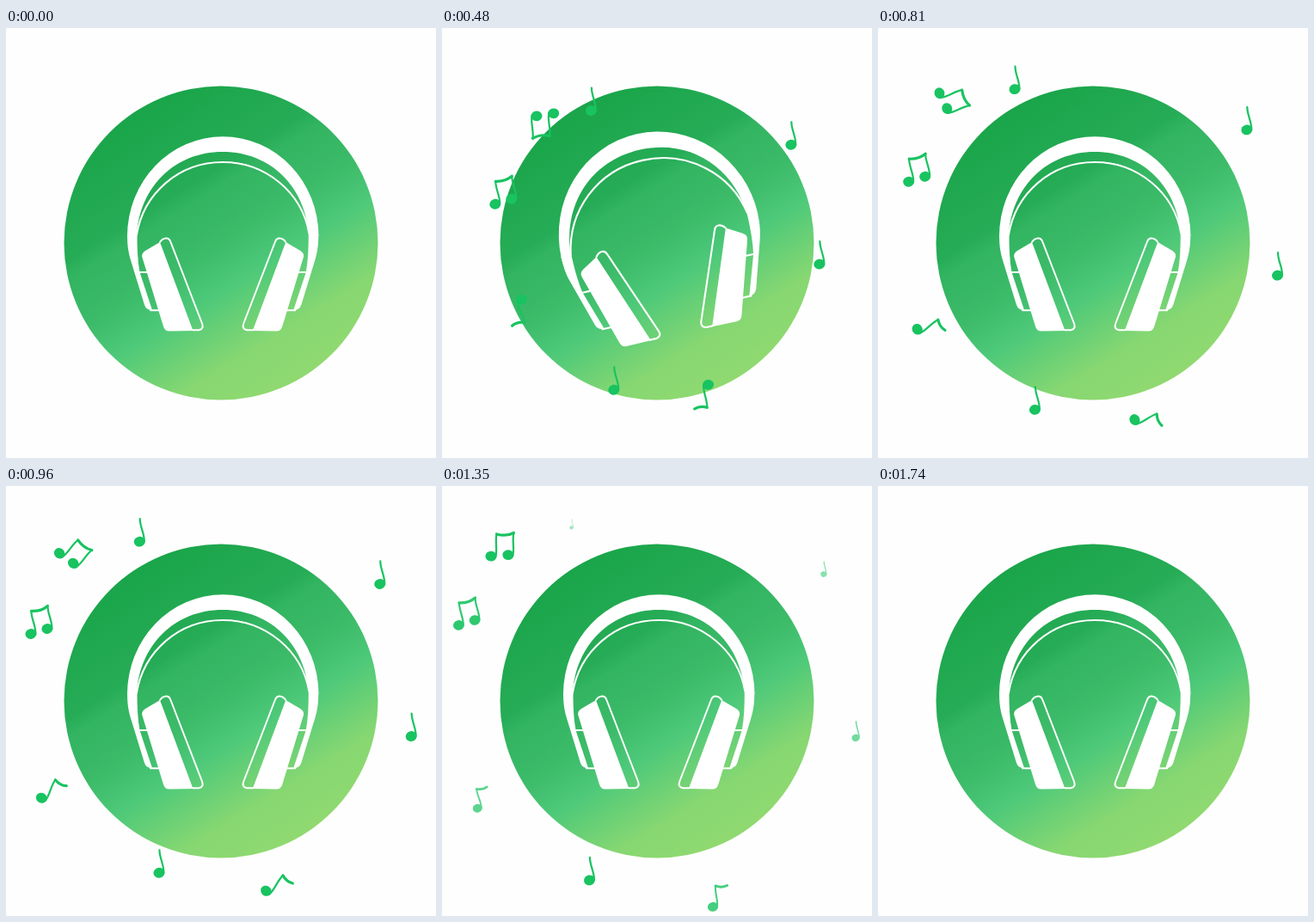
Animation, 500 px wide and 500 px high, one loop 2040 ms. Source, as an HTML page:

```html
<!DOCTYPE html>
<html lang="en">
<head>
<meta charset="utf-8">
<title>Headphones</title>
<style>
  html, body { margin: 0; width: 100%; height: 100%; overflow: hidden; background: #fefefe; }
  svg { display: block; width: 100%; height: 100%; }
  .line { fill: none; stroke: #fff; stroke-width: 2; stroke-linejoin: round; stroke-linecap: round; }
  #notes ellipse { fill: #18c360; }
  #notes path { fill: none; stroke: #18c360; stroke-width: 2.2; stroke-linecap: round; stroke-linejoin: round; }
  #notes .beam { stroke-width: 3.2; }
</style>
</head>
<body>
<svg viewBox="0 0 500 500">
  <defs>
    <linearGradient id="disc" gradientUnits="userSpaceOnUse" x1="154" y1="95.5" x2="346" y2="404.5">
      <stop offset="0" stop-color="#1aa54a"/>
      <stop offset=".29" stop-color="#26ac56"/>
      <stop offset=".34" stop-color="#32b461"/>
      <stop offset=".5" stop-color="#3cbb69"/>
      <stop offset=".63" stop-color="#4dc979"/>
      <stop offset=".84" stop-color="#86d772"/>
      <stop offset="1" stop-color="#90d970"/>
    </linearGradient>
    <g id="cup">
      <path fill="#fff" d="M141 240C141 252 142 260 145 270L161 322Q163 328 170 328L155.500 284C153 270 152.500 256 152.500 240Z"/>
      <path class="line" d="M155.500 284H163.500M168 328.300H178"/>
      <path fill="#fff" d="M158.500 267Q157 262 162 259L179 249L217.500 352L190 352.500Q184.500 352.500 183 347Z"/>
      <path class="line" d="M179 249C183 243.500 189.500 242.500 191.500 249L228 343.500Q230.500 350 224 351.300H217"/>
    </g>
  </defs>
  <circle cx="250" cy="250" r="182.500" fill="url(#disc)"/>
  <g id="phones">
    <path fill="#fff" d="M141 242A111 115.500 0 0 1 363.500 242L352 242C349 185 308 144 252 144S155 185 152 242Z"/>
    <path class="line" d="M151.800 241C160 192 201 156 252 156S344 192 352.200 238"/>
    <use href="#cup"/>
    <use href="#cup" transform="translate(504.300) scale(-1 1)"/>
  </g>
  <g id="notes"></g>
</svg>
<script>
  const LOOP = 2040, STEP = 30, SPIN = 53;
  const phones = document.getElementById('phones');
  const layer = document.getElementById('notes');

  const clamp = v => Math.min(1, Math.max(0, v));
  const wave = v => (1 - Math.cos(Math.PI * clamp(v))) / 2;
  // rises from a to b, falls from b to c
  const swing = (t, a, b, c) => wave(t < b ? (t - a) / (b - a) : (c - t) / (c - b));

  const stem = (x, y) =>
    `<ellipse cx="${x}" cy="${y}" rx="6.5" ry="5.9" transform="rotate(-12 ${x} ${y})"/>` +
    `<path d="M${x + 5.4} ${y}C${x + 6} ${y - 9} ${x + 0.5} ${y - 17} ${x + 0.5} ${y - 26.5}"/>`;
  const beam = d => `<path class="beam" d="M.5-26.500${d}"/>`;

  const shapes = {
    plain: { px: 1, py: -11, speed: 14.2, art: stem(0, 0) },
    hook: { px: 7, py: -15, speed: 15.4, art: stem(0, 0) + beam('Q9-24.500 15-28.500') },
    pair: { px: 13, py: -16, speed: 18.2, art: stem(0, 0) + stem(19, -6) + beam('Q12-26 19.500-32.500') }
  };

  // in order of vanishing: shape, resting place, direction back to the disc, time of appearing, tilt
  const notes = [
    ['plain', 153, 48, 60, 328],
    ['plain', 441, 99, 143, 328],
    ['plain', 478, 283, 207, 362],
    ['hook', 50, 359, -36, 355, 12],
    ['hook', 321, 472, -114, 310, 22],
    ['pair', 36, 150, 45, 364],
    ['plain', 175, 444, -53, 270],
    ['pair', 77, 73, 47, 342, 29]
  ].map(([shape, x, y, heading, start, tilt = 0], i) => {
    const el = document.createElementNS('http://www.w3.org/2000/svg', 'g');
    const { px, py, speed, art } = shapes[shape];
    const a = heading * Math.PI / 180;
    el.innerHTML = art;
    layer.append(el);
    return {
      el, px, py, x, y, tilt, start,
      dx: speed * Math.cos(a), dy: speed * Math.sin(a),
      spin: tilt ? SPIN : 0, end: 1110 + 40 * i
    };
  });

  function draw(t) {
    const turn = -16 * swing(t, 270, 570, 810);
    const size = 1 + 0.08 * swing(t, 310, 590, 810);
    phones.setAttribute('transform',
      `translate(252.5 238) rotate(${turn}) scale(${size}) translate(-252.5 -238)`);

    // one decaying glide drives both drift and spin
    const k = 5.05 * Math.exp((360 - t) / 440) - 0.83;
    for (const n of notes) {
      const out = clamp((t - n.end) / 300);
      n.el.setAttribute('opacity', clamp((t - n.start) / 90) * (1 - 0.75 * out));
      n.el.setAttribute('transform',
        `translate(${n.x + n.dx * k} ${n.y + n.dy * k}) rotate(${n.tilt + n.spin * k}) ` +
        `scale(${1 - out * out}) translate(${-n.px} ${-n.py})`);
    }
  }

  const begin = performance.now();
  function tick() {
    const t = (performance.now() - begin) % LOOP;
    draw(Math.floor(t / STEP) * STEP);
    requestAnimationFrame(tick);
  }
  tick();
</script>
</body>
</html>
```
